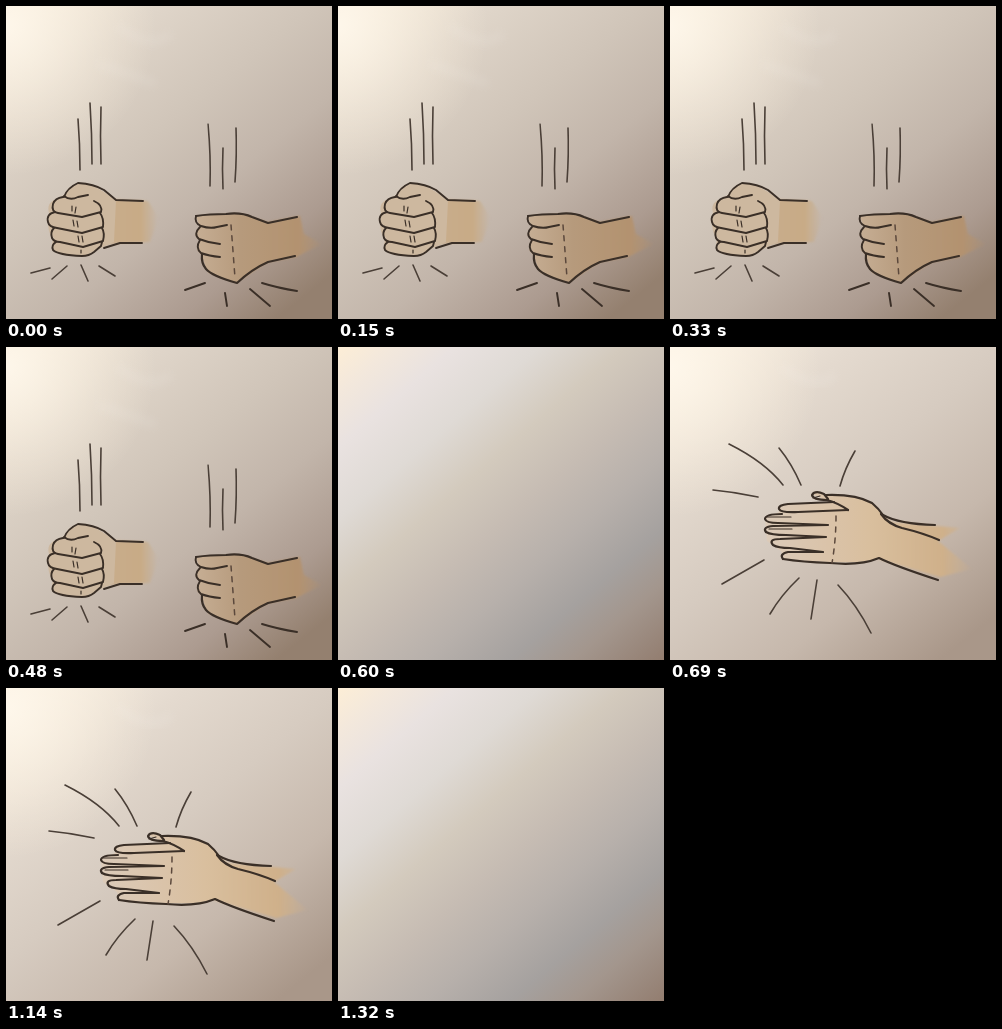
Recreate the animation shown at these times as an HTML page. Size 326 px wide and 313 px high, loop 1350 ms.

```html
<!DOCTYPE html>
<html lang="en">
<head>
<meta charset="utf-8">
<title>Stomp, stomp, clap</title>
<style>
  html, body { margin: 0; width: 100%; height: 100%; overflow: hidden; background: #c9bfb6; }
  svg { display: block; width: 100vw; height: 100vh; }
  .ink { fill: none; stroke: #3a2f27; stroke-width: 1.9; stroke-linecap: round; stroke-linejoin: round; }
  .bold { stroke-width: 2.2; }
  .ray { stroke: #4a3f37; stroke-width: 1.6; }
  .thin { stroke-width: 1.2; }
  .knuckle { stroke-dasharray: 5 6; stroke-width: 1.5; stroke: #5b483c; }
  .crease { fill: none; stroke: #fff; stroke-width: 7; opacity: .1; filter: url(#soft); }
</style>
</head>
<body>
<svg viewBox="0 0 326 313" preserveAspectRatio="none">
  <defs>
    <linearGradient id="blankTone" gradientUnits="userSpaceOnUse" x1="8" y1="-8" x2="304" y2="338">
      <stop offset="0" stop-color="#fdeed6"/>
      <stop offset=".08" stop-color="#f3e8dc"/>
      <stop offset=".17" stop-color="#e9e2e0"/>
      <stop offset=".29" stop-color="#dfdad5"/>
      <stop offset=".41" stop-color="#d3cabd"/>
      <stop offset=".53" stop-color="#c6bcb3"/>
      <stop offset=".65" stop-color="#b7b0ab"/>
      <stop offset=".77" stop-color="#a5a19f"/>
      <stop offset=".86" stop-color="#a3968d"/>
      <stop offset="1" stop-color="#917b6d"/>
    </linearGradient>
    <linearGradient id="stompTone" gradientUnits="userSpaceOnUse" x1="20" y1="0" x2="270" y2="313">
      <stop offset="0" stop-color="#f3e9da"/>
      <stop offset=".2" stop-color="#e0d6ca"/>
      <stop offset=".45" stop-color="#d0c5b9"/>
      <stop offset=".65" stop-color="#c2b5aa"/>
      <stop offset=".85" stop-color="#ac9b90"/>
      <stop offset="1" stop-color="#94806f"/>
    </linearGradient>
    <linearGradient id="clapTone" gradientUnits="userSpaceOnUse" x1="20" y1="0" x2="270" y2="313">
      <stop offset="0" stop-color="#f8efe2"/>
      <stop offset=".25" stop-color="#e4dacf"/>
      <stop offset=".5" stop-color="#d6cbc0"/>
      <stop offset=".75" stop-color="#c6b8ac"/>
      <stop offset="1" stop-color="#a99789"/>
    </linearGradient>
    <radialGradient id="lamp" gradientUnits="userSpaceOnUse" cx="0" cy="20" r="150">
      <stop offset="0" stop-color="#fff8ec" stop-opacity=".9"/>
      <stop offset="1" stop-color="#fff3df" stop-opacity="0"/>
    </radialGradient>
    <linearGradient id="arm" gradientUnits="userSpaceOnUse" x1="95" y1="0" x2="152" y2="0">
      <stop offset="0" stop-color="#c9ad8d"/>
      <stop offset=".7" stop-color="#c8ab86"/>
      <stop offset="1" stop-color="#c8ab86" stop-opacity="0"/>
    </linearGradient>
    <linearGradient id="skin" gradientUnits="userSpaceOnUse" x1="190" y1="0" x2="318" y2="0">
      <stop offset="0" stop-color="#c6ae94"/>
      <stop offset=".35" stop-color="#b69a7c"/>
      <stop offset=".8" stop-color="#b3926f"/>
      <stop offset="1" stop-color="#b3926f" stop-opacity="0"/>
    </linearGradient>
    <linearGradient id="palm" gradientUnits="userSpaceOnUse" x1="95" y1="0" x2="304" y2="0">
      <stop offset="0" stop-color="#dccbb9"/>
      <stop offset=".3" stop-color="#dac3a9"/>
      <stop offset=".5" stop-color="#d9bf9e"/>
      <stop offset=".85" stop-color="#cfb08a"/>
      <stop offset="1" stop-color="#cfb08a" stop-opacity="0"/>
    </linearGradient>
    <filter id="soft" x="-40%" y="-40%" width="180%" height="180%"><feGaussianBlur stdDeviation="4"/></filter>
    <filter id="wash"><feGaussianBlur stdDeviation="1.3"/></filter>
  </defs>

  <rect id="blank" width="326" height="313" fill="url(#blankTone)"/>

  <g id="stomp">
    <rect width="326" height="313" fill="url(#stompTone)"/>
    <rect width="326" height="313" fill="url(#lamp)"/>
    <path class="crease" d="M92 58L150 78M112 20Q145 45 165 28"/>

    <path filter="url(#wash)" fill="url(#arm)" d="M96 193L142 195L153 212L144 236L97 238Z"/>
    <path fill="#cdb89f" d="M58 189Q64 178 74 177Q90 178 110 195L108 236L78 250Q60 250 49 246Q44 240 48 232Q40 228 43 207Q40 196 51 193Z"/>
    <path class="ink" d="M58 191Q61 182 72 177Q88 178 98 184L110 194L137 195M136 237L114 237L98 242"/>
    <path class="ink" d="M57 191Q49 192 47 198Q45 206 52 207L76 211L95 206Q97 199 88 195M58 190Q64 195 72 191L82 189"/>
    <path class="ink" d="M49 206Q40 208 42 216Q43 221 51 222L76 227L97 221Q98 212 94 207"/>
    <path class="ink" d="M48 222Q44 226 46 232Q48 236 54 236L77 241L97 235Q99 227 96 222"/>
    <path class="ink" d="M50 236Q45 239 47 244Q52 249 76 250Q83 250 88 246L95 240L96 236"/>
    <path class="ink thin" d="M66 200L66 205M70 201L69 207M67 214L68 220M71 215L72 221M72 230L73 236M76 230L77 236M75 244L75 247"/>
    <path class="ink ray" d="M72 113Q74 138 74 164M84 97Q86 128 86 158M95 101Q94 130 95 158"/>
    <path class="ink ray" d="M25 267L44 262M46 273L61 260M75 259L82 275M93 260L109 270"/>

    <path filter="url(#wash)" fill="url(#skin)" d="M240 210L262 216L294 210L298 228L316 238L290 251L262 256L232 275Z"/>
    <path fill="url(#skin)" d="M190 211Q212 206 236 208L262 217L264 254L231 277L202 267L196 250L191 244L194 235L189 229L194 221Z"/>
    <path class="ink bold" d="M190 210Q203 208 220 208Q235 206 246 211L262 217L291 211"/>
    <path class="ink" d="M190 210Q188 217 195 220Q204 223 211 221L221 219M194 221Q187 228 193 233Q203 237 214 238"/>
    <path class="ink" d="M194 234Q189 242 195 247Q203 250 214 251"/>
    <path class="ink bold" d="M196 248Q195 257 200 263Q206 270 231 277Q246 263 262 256L289 250"/>
    <path class="ink knuckle" d="M225 219Q227 245 229 272"/>
    <path class="ink ray" d="M202 118Q205 150 204 180M217 142Q216 163 217 183M230 122Q231 148 229 176" style="clip-path: inset(0 0 0 0)"/>
    <path class="ink" d="M179 284L199 277M219 287L221 300M244 283L264 300M256 277Q272 282 291 285"/>
  </g>

  <g id="clap">
    <rect width="326" height="313" fill="url(#clapTone)"/>
    <rect width="326" height="313" fill="url(#lamp)"/>
    <path class="crease" d="M112 20Q145 45 165 28"/>

    <path filter="url(#wash)" fill="url(#palm)" d="M205 163L222 175L290 181L268 194L302 222L270 230L208 212Z"/>
    <path fill="url(#palm)" d="M142 147Q147 143 156 149Q186 147 204 157L222 178L209 211Q190 219 114 212L111 204L97 194L95 171L109 165L110 158L160 155Z"/>
    <path class="ink bold" d="M178 163Q168 156 157 153Q143 153 142 148Q145 143 154 147L158 152M156 148Q186 147 202 156Q209 162 213 168Q229 177 265 178"/>
    <path class="ink bold" d="M211 167Q218 177 232 181Q253 186 269 193M113 212Q132 215 160 216Q190 219 209 211Q225 219 268 233"/>
    <path class="ink bold" d="M164 155L118 157Q108 158 109 162Q111 166 128 165L178 163"/>
    <path class="ink bold" d="M112 167Q95 167 95 172Q96 176 108 176L158 178L103 179Q92 180 96 185"/>
    <path class="ink bold" d="M96 185Q101 188 116 188L156 190L110 192Q98 192 103 198Q108 201 120 201L153 205L118 205Q109 207 113 212"/>
    <path class="ink thin" d="M97 170L121 170M99 182L122 182M143 151L150 149"/>
    <path class="ink knuckle" d="M166 169Q166 193 162 216"/>
    <path class="ink ray" d="M59 97Q95 115 113 138M109 101Q122 117 131 138M185 104Q175 121 170 139M43 143Q65 145 88 150"/>
    <path class="ink ray" d="M52 237L94 213M100 267Q111 248 129 231M147 233L141 272M168 238Q187 258 201 286"/>
  </g>
</svg>
<script>
const LOOP = 1350;
const stomp = document.getElementById('stomp');
const clap = document.getElementById('clap');
const within = (t, from, to) => t >= from && t < to;
const show = (el, on) => el.setAttribute('display', on ? 'inline' : 'none');

// Two stomps and a longer clap, each followed by a short blank flash.
function draw(t) {
  show(stomp, within(t, 0, 270) || within(t, 330, 600));
  show(clap, within(t, 660, 1290));
}

const start = performance.now();
function tick() {
  draw((performance.now() - start) % LOOP);
  requestAnimationFrame(tick);
}
draw(0);
requestAnimationFrame(tick);
</script>
</body>
</html>
```
